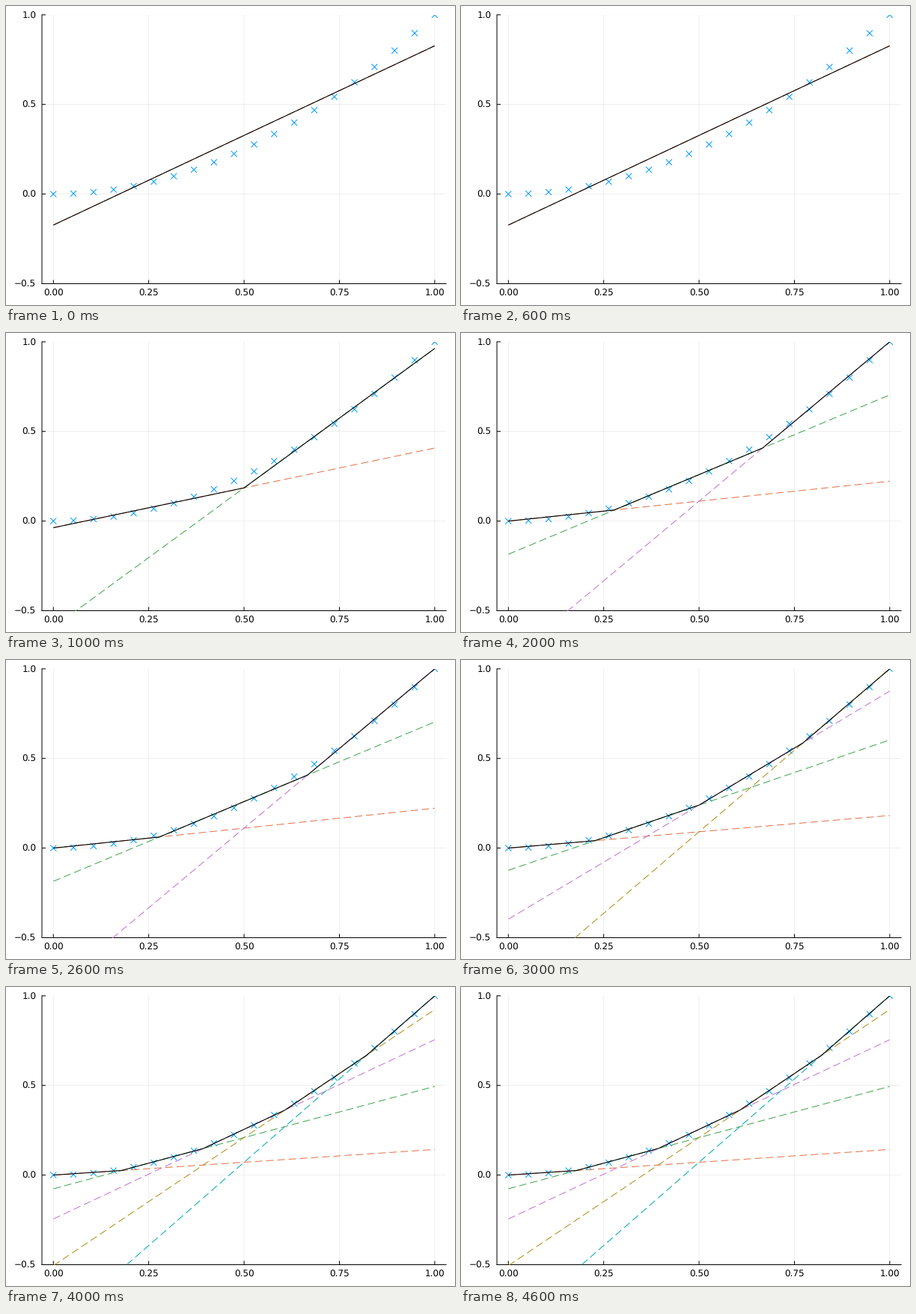
Write a matplotlib script that moves like this. It is 600 px wide and 400 px high and loops after 5000 ms.

```python
import numpy as np
import matplotlib.pyplot as plt
from matplotlib.animation import FuncAnimation
from matplotlib.collections import LineCollection

W, H, DPI = 600, 400, 100
PX = 72 / DPI  # points per pixel
LEFT, RIGHT, TOP, BOTTOM = 48, 588.19, 11.81, 371.5
XLIM, YLIM = (-0.03, 1.03), (-0.5, 1)
UX = (XLIM[1] - XLIM[0]) / (RIGHT - LEFT)  # data units per pixel
UY = (YLIM[1] - YLIM[0]) / (BOTTOM - TOP)
XTICKS = [0, 0.25, 0.5, 0.75, 1]
YTICKS = [-0.5, 0, 0.5, 1]
BLUE = "#009af9"
COLORS = ["#e26f46", "#3da44d", "#c271d2", "#ac8d18", "#00a9ad"]

# Each fit: grid size n and the index pairs (a, b) whose secants of x^2 are used.
FITS = [
    (9, [(2, 7)]),
    (9, [(1, 3), (6, 8)]),
    (9, [(0, 2), (3, 5), (7, 9)]),
    (11, [(3 * i, 3 * i + 2) for i in range(4)]),
    (14, [(3 * i, 3 * i + 2) for i in range(5)]),
]

plt.rcParams.update({
    "font.family": "DejaVu Sans",
    "font.size": 12 * PX,
    "lines.scale_dashes": False,
    "path.snap": False,
    "text.hinting": "none",
})


def secants(n, pairs):
    """Slopes and intercepts of the chords of x^2 between a/n and b/n."""
    a, b = np.array(pairs).T / n
    return a + b, -a * b


def envelope(m, c):
    """Corner points of the maximum of the lines m*x + c on [0, 1]."""
    knots = -np.diff(c) / np.diff(m)
    x = np.concatenate([[0], knots, [1]])
    return x, (np.outer(x, m) + c).max(axis=1)


def strokes(segments, color, z, clip=True):
    lines = LineCollection(segments, colors=color, linewidths=PX, zorder=z)
    ax.add_collection(lines, autolim=False)
    lines.set_clip_on(clip)


fig = plt.figure(figsize=(W / DPI, H / DPI), dpi=DPI, facecolor="white")
ax = fig.add_axes([LEFT / W, 1 - BOTTOM / H, (RIGHT - LEFT) / W, (BOTTOM - TOP) / H])
ax.set(xlim=XLIM, ylim=YLIM)
ax.set_xticks(XTICKS, [f"{x:.2f}" for x in XTICKS])
ax.set_yticks(YTICKS, [f"{y:.1f}".replace("-", "\u2212") for y in YTICKS])
ax.tick_params(axis="x", length=0, pad=4.9)
ax.tick_params(axis="y", length=0, pad=5.5)
ax.set_axisbelow(True)
ax.grid(color="black", alpha=0.1, linewidth=0.625 * PX)
ax.spines[["top", "right"]].set_visible(False)
ax.spines[["left", "bottom"]].set_linewidth(PX)

x0, y0 = XLIM[0], YLIM[0]
strokes([[(x, y0), (x, y0 + 5 * UY)] for x in XTICKS]
        + [[(x0, y), (x0 + 5 * UX, y)] for y in YTICKS], "black", 2.5, clip=False)

dx, dy = 4 * UX, 4 * UY
strokes([[(x - dx, x * x - s * dy), (x + dx, x * x + s * dy)]
         for x in np.linspace(0, 1, 20) for s in (-1, 1)], BLUE, 2)

pieces = [
    ax.plot([], [], color=col, lw=PX, dashes=(10 * PX, 5 * PX),
            dash_capstyle="butt", zorder=3)[0]
    for col in COLORS
]
(fit,) = ax.plot([], [], color="black", lw=1.1 * PX, solid_capstyle="butt", zorder=4)


def draw(i):
    m, c = secants(*FITS[i])
    for k, line in enumerate(pieces):
        if k < len(m):
            line.set_data([0, 1], [c[k], m[k] + c[k]])
        else:
            line.set_data([], [])
    fit.set_data(*envelope(m, c))
    return [*pieces, fit]


anim = FuncAnimation(fig, draw, frames=len(FITS), interval=1000,
                     repeat=True, repeat_delay=0, blit=False)
plt.show()
```
